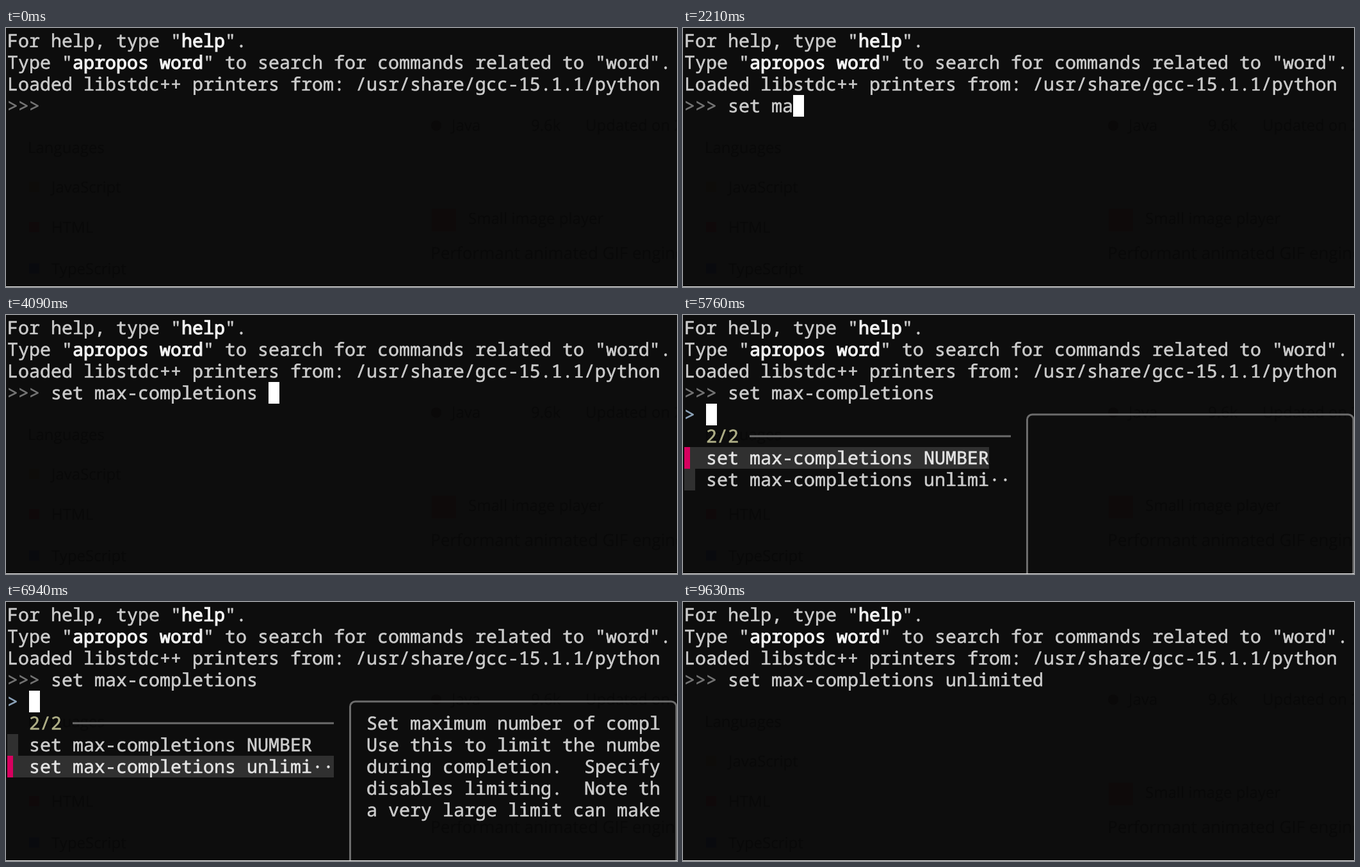
An HTML page for the animation above (9690 ms loop, 1048 px wide and 406 px high).

```html
<!DOCTYPE html>
<html lang="en">
<head>
<meta charset="utf-8">
<title>Debugger completion</title>
<style>
html, body { margin: 0; width: 100%; height: 100%; overflow: hidden; background: #0d0d0d; }
svg { display: block; width: 1048px; height: 406px; }
text { white-space: pre; text-rendering: geometricPrecision; }
#back text { font: 24px "Open Sans", sans-serif; fill: #090909; }
#base, #live { font: 28.333px "Noto Sans Mono", "DejaVu Sans Mono", monospace; }
</style>
</head>
<body>
<svg viewBox="0 0 1048 406">
  <rect width="1048" height="406" fill="#0d0d0d"/>
  <g id="back">
    <circle cx="672" cy="153" r="8" fill="#0a0909"/>
    <rect x="36" y="241" width="16" height="16" fill="#0d0c0a"/>
    <rect x="36" y="304" width="16" height="16" fill="#0f090a"/>
    <rect x="36" y="369" width="16" height="16" fill="#090a0e"/>
    <rect x="665" y="283" width="38" height="36" fill="#0e0a0a"/>
    <text x="34" y="196">Languages</text>
    <text x="71" y="258">JavaScript</text>
    <text x="71" y="321">HTML</text>
    <text x="71" y="386">TypeScript</text>
    <text x="696" y="161">Java</text>
    <text x="820" y="161">9.6k</text>
    <text x="905" y="161">Updated on 2</text>
    <text x="722" y="307">Small image player</text>
    <text x="663" y="362" style="font-size:26px">Performant animated GIF engine</text>
  </g>
  <g id="base"></g>
  <g id="live"></g>
  <rect y="405" width="1048" height="1" fill="#f0f0f0"/>
</svg>
<script>
const LOOP = 9690;
const FG = '#cccccc', BRIGHT = '#f2f2f2', DIM = '#767676', SHADE = '#303030',
      LINE = '#6c6c6c', BG = '#0d0d0d';
const x = col => 2 + 17 * col;
const y = row => 3 + 34 * row;

const rect = (left, top, w, h, fill) =>
  `<rect x="${left}" y="${top}" width="${w}" height="${h}" fill="${fill}"/>`;
const cells = (col, row, n, fill) => rect(x(col), y(row), 17 * n, 34, fill);
// A thin stroke gives the medium weight of the terminal face
const text = (col, row, str, fill = FG, stroke = 0.6) =>
  `<text x="${x(col)}" y="${y(row) + 27}" fill="${fill}" stroke="${fill}" stroke-width="${stroke}">${str}</text>`;
const bold = (col, row, str) => text(col, row, str, BRIGHT, 1.2);
const cursor = (col, row) => cells(col, row, 1, '#ffffff');

const COMMANDS = ['max-completions', 'max-user-call-depth', 'max-value-size',
  'may-call-functions', 'may-insert-breakpoints', 'may-insert-fast-tracep··']
  .map(s => 'set ' + s);
const VALUES = ['NUMBER', 'unlimi··'].map(s => 'set max-completions ' + s);
const HELP = ['Set maximum number of compl', 'Use this to limit the numbe',
  'during completion.  Specify', 'disables limiting.  Note th', 'a very large limit can make'];

// Command line; the cursor column counts from the left edge, null hides it
const prompt = (str, col = 4 + str.length) =>
  text(4, 3, str) + (col === null ? '' : cursor(col, 3));

function picker(str, count, items, chosen, help) {
  const ruleX = x(3 + count.length);
  let out = prompt(str, null) + text(0, 4, '>', '#8fa6bd') + cursor(2, 4)
    + text(2, 5, count, '#afaf87') + rect(ruleX, 188.5, 512 - ruleX, 3, LINE);
  items.forEach((item, i) => {
    const row = 6 + i, on = i === chosen;
    out += cells(0, row, item.length + 2, on ? SHADE : BG)
      + (on ? rect(2, y(row), 9, 34, '#d7005f') : cells(0, row, 1, SHADE))
      + text(2, row, item, on ? '#e4e4e4' : FG);
  });
  out += `<rect x="537.5" y="156" width="509.5" height="300" rx="8" fill="none" stroke="${LINE}" stroke-width="3"/>`;
  if (help) HELP.forEach((s, i) => { out += cells(33, 5 + i, 27, BG) + text(33, 5 + i, s); });
  return out;
}

const first = help => picker('set ma', '10/10', COMMANDS, 0, help);
const second = (chosen, help) => picker('set max-completions', '2/2', VALUES, chosen, help);
const DONE = 'set max-completions unlimited ';

const STEPS = [
  [0, ''],
  [460, prompt('')],
  [1000, prompt('s')],
  [1070, prompt('se')],
  [1340, prompt('set')],
  [1680, prompt('set ')],
  [2100, prompt('set m')],
  [2210, prompt('set ma')],
  [2880, first(false)],
  [3010, first(true)],
  [4050, prompt('set ma', null)],
  [4090, prompt('set max-completions ')],
  [5760, second(0, false)],
  [5880, second(0, true)],
  [6940, second(1, true)],
  [7470, prompt('set max-completions', null)],
  [7540, prompt(DONE)],
  [9630, prompt(DONE, null)]
];

document.getElementById('base').innerHTML =
  text(0, 0, 'For help, type "') + bold(16, 0, 'help') + text(20, 0, '".')
  + text(0, 1, 'Type "') + bold(6, 1, 'apropos word')
  + text(18, 1, '" to search for commands related to "word".')
  + text(0, 2, 'Loaded libstdc++ printers from: /usr/share/gcc-15.1.1/python')
  + text(0, 3, '>>>', DIM);

const live = document.getElementById('live');
const start = performance.now();
let shown = -1;
function draw() {
  const t = Math.max(0, performance.now() - start) % LOOP;
  const step = STEPS.findLastIndex(s => s[0] <= t);
  if (step !== shown) live.innerHTML = STEPS[shown = step][1];
  requestAnimationFrame(draw);
}
draw();
</script>
</body>
</html>
```
